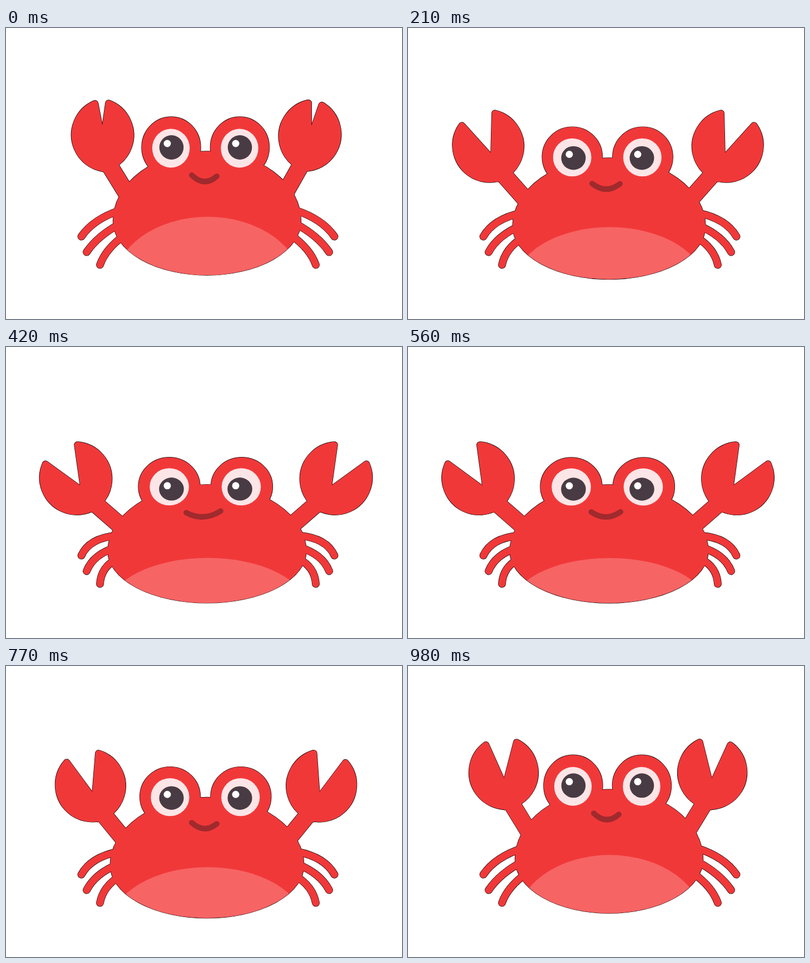
Write an HTML page with a canvas that moves like this. It is 712 by 524 pixels and loops after 1050 ms.

```html
<!DOCTYPE html>
<html lang="en">
<head>
<meta charset="utf-8">
<title>Crab</title>
<style>
  html, body { margin: 0; width: 100%; height: 100%; overflow: hidden; background: #fff; }
  canvas { display: block; }
</style>
</head>
<body>
<canvas id="stage" width="712" height="524"></canvas>
<script>
const ctx = document.getElementById('stage').getContext('2d');
const LOOP = 1050, STEP = 70;
const RED = '#f13839', EDGE = '#120506';
const { PI, cos, max, min } = Math;

const mix = (a, b, p) => a + (b - a) * p;
const clamp = u => max(0, min(1, u));

// Eases down, rests, eases back up
const dip = t => (1 - cos(PI * clamp(min(t, 1005 - t) / 440))) / 2;

// Smooth hump around zero
const bump = (t, radius) => (1 + cos(PI * clamp(Math.abs(t) / radius))) / 2;

function pose(t) {
  const sway = dip(t + 35);
  return {
    p: dip(t),
    sway,
    pinch: bump(t, 85) + bump(t - 840, 85) + bump(t - LOOP, 85),
    grin: bump(t - 400, 300)
  };
}

function oval(x, y, rx, ry, color) {
  ctx.beginPath();
  ctx.ellipse(x, y, rx, ry, 0, 0, 2 * PI);
  if (color) {
    ctx.fillStyle = color;
    ctx.fill();
  }
}

function mirrored(axis, draw) {
  ctx.save();
  ctx.translate(axis * 2, 0);
  ctx.scale(-1, 1);
  draw();
  ctx.restore();
}

function bodyPath(p) {
  const y = 348 + 20 * p, rx = 169 + 9.5 * p;
  ctx.beginPath();
  ctx.ellipse(361.5, y, rx, 126 - 6 * p, 0, PI, 2 * PI);
  ctx.ellipse(361.5, y, rx, 97 - 4 * p, 0, 0, PI);
  ctx.closePath();
}

// Red silhouette, grown outwards by the given amount
function silhouette({ p, sway, pinch }, color, grow) {
  ctx.fillStyle = ctx.strokeStyle = color;
  ctx.lineCap = ctx.lineJoin = 'round';

  const fill = () => {
    ctx.fill();
    if (grow) {
      ctx.lineWidth = grow * 2;
      ctx.stroke();
    }
  };
  const limb = (width, x1, y1, cx, cy, x2, y2) => {
    ctx.lineWidth = width + grow * 2;
    ctx.beginPath();
    ctx.moveTo(x1, y1);
    ctx.quadraticCurveTo(cx, cy, x2, y2);
    ctx.stroke();
  };
  const legs = () => {
    limb(12.5, 206 - 8 * p, 328 + 12 * p, 157 - 7 * p, 344, 135.5, 375.5);
    limb(12.5, 206 - 8 * p, 352 + 9 * p, 165 - 8 * p, 374 - p, 145, 403.5);
    limb(12.5, 212 - 13 * p, 374 + 8 * p, 179 - 8 * p, 398 - 2 * p, 169, 426.5);
  };
  const jaw = () => {
    ctx.beginPath();
    ctx.moveTo(9, 12);
    ctx.lineTo(9, -94);
    ctx.arc(3.5, -94, 5.5, 0, -1.787, true);
    ctx.arc(16.7, -34, 67, -1.787, 1.9, true);
    ctx.closePath();
    fill();
  };
  const claw = lean => {
    const x = 175 - 30 * sway + max(0, lean) * pinch, y = 229 + 40 * p;
    const ax = 222 - 8 * p, ay = 306 + 23 * p;
    const tilt = 5 + 26 * sway + lean * pinch;
    const open = 20 + 3 * sway - 10.5 * pinch;
    limb(30, x, y, (x + ax) / 2, (y + ay) / 2, ax, ay);
    ctx.save();
    ctx.translate(x, y);
    ctx.rotate(-tilt * PI / 180);
    for (const side of [1, -1]) {
      ctx.save();
      ctx.scale(side, 1);
      ctx.rotate(-open * PI / 180);
      jaw();
      ctx.restore();
    }
    ctx.restore();
  };

  legs();
  mirrored(363, legs);
  claw(-4);
  mirrored(359.5, () => claw(4));
  bodyPath(p);
  fill();
  for (const side of [-1, 1]) {
    oval(358.7 + side * (61.7 + 3.5 * p), 215 + 36.5 * p, 53 + 2.5 * p, 55 - 2.5 * p);
    fill();
  }
}

function belly(p) {
  const ry = 121 - 31 * p;
  ctx.save();
  bodyPath(p);
  ctx.clip();
  oval(362.5, 340 + 40 * p + ry, 168 + 10 * p, ry, '#f76464');
  ctx.restore();
}

function eye(p, side) {
  oval(358.3 + side * (61.7 + 3 * p), 216.5 + 35.5 * p, 33.7 + 1.6 * p, 35 - 1.5 * p, '#fce5e7');
  oval(359 + side * 61.5, 215 + 41 * p, 21.8 + .5 * p, 22 - 1.3 * p, '#493b43');
  oval(351.5 + side * 61.5, 208 + 42 * p, 6.5, 6.5, '#fff');
}

function mouth({ p, grin }) {
  const half = 22.5 + 8.5 * grin, tilt = 1 - 2.5 * grin;
  const x = 356.5 - 1.5 * grin, y = 266 + 31 * p, mid = 276.5 + 29.5 * p;
  ctx.strokeStyle = '#a02a2d';
  ctx.lineWidth = 10;
  ctx.beginPath();
  ctx.moveTo(x - half, y - tilt);
  ctx.quadraticCurveTo(x, 2 * mid - y, x + half, y + tilt);
  ctx.stroke();
}

function frame(now) {
  const crab = pose(Math.floor(now % LOOP / STEP) * STEP);
  ctx.clearRect(0, 0, 712, 524);
  silhouette(crab, EDGE, .7);
  silhouette(crab, RED, 0);
  belly(crab.p);
  eye(crab.p, -1);
  eye(crab.p, 1);
  mouth(crab);
  requestAnimationFrame(frame);
}
requestAnimationFrame(frame);
</script>
</body>
</html>
```
